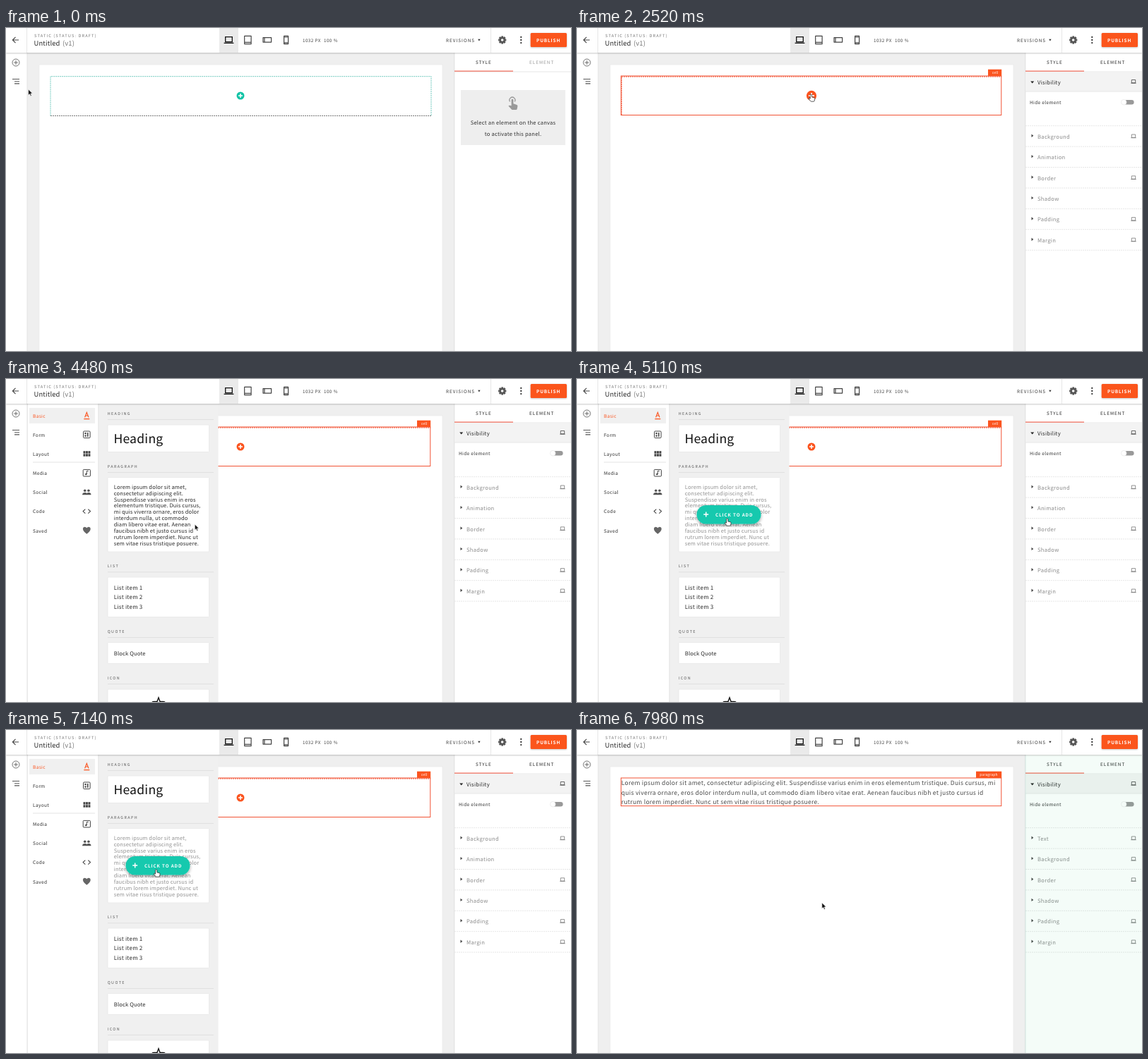
An HTML page that plays this animation: 800 by 458 pixels, repeating every 8000 ms.

```html
<!DOCTYPE html>
<html lang="en">
<head>
<meta charset="utf-8">
<title>Page editor</title>
<style>
  html, body { margin: 0; width: 100%; height: 100%; overflow: hidden; background: #fff; }
  svg { display: block; width: 100vw; height: 100vh; }
  text {
    font-family: "Noto Sans CJK SC", "Noto Sans CJK JP", "Noto Sans CJK TC", "Noto Sans CJK KR", "Noto Sans CJK", "Open Sans", sans-serif;
    text-rendering: geometricPrecision;
    white-space: pre;
  }
</style>
</head>
<body>
<svg id="stage" viewBox="0 0 800 458"></svg>
<script>
const LOOP = 8000;
const TEAL = '#12c3a6', RED = '#f0401f', ORANGE = '#fb541f', INK = '#2b2b2b', GREY = '#8b8b8b';

// The CJK face draws its Latin letters about 1.117 times larger per em.
const text = (x, y, str, size, gap = 0, fill = INK, extra = '') =>
  `<text x="${x}" y="${y}" font-size="${(size / 1.117).toFixed(2)}" letter-spacing="${gap}" fill="${fill}" ${extra}>${str}</text>`;
const rect = (x, y, w, h, fill, extra = '') =>
  `<rect x="${x}" y="${y}" width="${w}" height="${h}" fill="${fill}" ${extra}/>`;
const line = (d, stroke, width = 1, extra = '') =>
  `<path d="${d}" fill="none" stroke="${stroke}" stroke-width="${width}" ${extra}/>`;
const shape = (d, fill, extra = '') => `<path d="${d}" fill="${fill}" ${extra}/>`;
const dot = (x, y, r, fill, extra = '') => `<circle cx="${x}" cy="${y}" r="${r}" fill="${fill}" ${extra}/>`;
const group = (id, body, extra = '') => `<g id="${id}" ${extra}>${body}</g>`;
const laptop = (x, y, stroke = '#777') =>
  line(`M${x - 2.7} ${y + 1.8}v-4.3h5.4v4.3zM${x - 3.7} ${y + 2.2}h7.4`, stroke, .8);

function header() {
  const gearTeeth = Array.from({ length: 8 }, (_, i) =>
    rect(701.3, 11.4, 2.8, 3, '#555', `transform="rotate(${i * 45} 702.7 17)"`)).join('');
  return rect(0, 0, 800, 35, '#fff', 'filter="url(#drop)"') +
    line('M18 17H9.5M13.5 12.8L9.3 17l4.2 4.2', '#444', 1.1) +
    line('M29.5 0V35M686.5 0V35', '#e6e6e6') +
    text(40, 13.3, 'STATIC (STATUS: DRAFT)', 6.4, 1.1, '#777') +
    text(39.5, 25, 'Untitled', 10.5, .15) + text(80, 25, '(v1)', 10.5, .15, '#777') +
    rect(302, 0, 27, 35, '#eaeaea') +
    line('M310.7 19.6v-7h9.6v7zM308.6 21.3h13.8', '#111', 1.3) +
    line('M337.7 11.3h9.4v11.4h-9.4zM337.7 20.4h9.4', '#444', 1.2, 'stroke-linejoin="round"') +
    line('M364 13.7h11.6v6.4h-11.6zM366 13.7v6.4', '#444', 1.2, 'stroke-linejoin="round"') +
    line('M393.6 11.4h6v11.2h-6zM393.6 13h6M393.6 20.8h6', '#444', 1.2, 'stroke-linejoin="round"') +
    text(420, 19.5, '1032 PX', 7, .45, '#444') + text(450, 19.5, '100 %', 7, .45, '#444') +
    text(623, 19.5, 'REVISIONS', 7, 1.05, '#333') + shape('M668.2 15.8h3.4l-1.7 2.6z', '#333') +
    gearTeeth + dot(702.7, 17, 3, 'none', 'stroke="#555" stroke-width="2.4"') +
    [12.9, 17, 21.1].map(y => dot(729.3, y, 1.15, '#333')).join('') +
    rect(742.7, 7, 51.3, 20, ORANGE, 'rx="1.5" filter="url(#drop)"') +
    text(751, 19.6, 'PUBLISH', 7.2, .85, '#fff', 'font-weight="700"');
}

function rail() {
  return rect(0, 35, 30, 423, '#fff') + line('M30 35V458', '#e3e3e3') +
    dot(14, 49, 5, 'none', 'stroke="#666" stroke-width=".9"') + line('M11.2 49h5.6M14 46.2v5.6', '#666') +
    line('M9 72.5h10M12 75.7h7M12 78.9h7', '#555', 1.1);
}

function drawer() {
  const names = ['Basic', 'Form', 'Layout', 'Media', 'Social', 'Code', 'Saved'];
  const cats = names.map((name, i) =>
    text(38, 54.6 + i * 27.15, name, 7.3, .36, i ? INK : ORANGE, 'font-weight="500"')).join('');
  const icons =
    line('M111.6 54.5l2.7-7.2 2.7 7.2M112.5 52h3.6M110.3 56.6h8', ORANGE, 1.1) +
    rect(109.5, 74, 9.6, 9.6, 'none', 'rx="1.2" stroke="#444"') +
    rect(111.4, 76, 2.2, 2.2, '#444') + rect(111.4, 79.5, 2.2, 2.2, '#444') + line('M115.7 76v5.8', '#444', 1.6) +
    [102.2, 106.3].map(y => [109.5, 113, 116.5].map(x => rect(x, y, 2.9, 3.4, '#444')).join('')).join('') +
    rect(109.2, 128.4, 10.2, 9.6, 'none', 'rx="1" stroke="#444"') +
    line('M114.3 135v-4.6h2.4', '#444', 1) + dot(113.3, 135, 1.2, '#444') +
    dot(111.7, 158.3, 1.8, '#555') + dot(116.9, 158.3, 1.8, '#555') +
    shape('M108 164.3q.3-3.2 3.8-3.2 2.2 0 2.6 1.2.6-1.2 2.6-1.2 3.4 0 3.5 3.2z', '#555') +
    line('M112.3 184.6l-3.2 3 3.2 3M116.3 184.6l3.2 3-3.2 3', '#444', 1.1) +
    shape('M114.3 219.8q-5.4-4.2-5.4-7 0-3 2.8-3 1.7 0 2.6 1.5.9-1.5 2.6-1.5 2.8 0 2.8 3 0 2.8-5.4 7z', '#666');

  const section = (y, name) => text(143.7, y, name, 6, 1.43, '#555') + line(`M144 ${y + 6.5}H294`, '#e0e0e0');
  const card = (y, h) => rect(144, y, 143.5, h, '#fff', 'stroke="#e6e6e6" stroke-width=".7" rx="1"');
  const lorem = ['Lorem ipsum dolor sit amet,', 'consectetur adipiscing elit.', 'Suspendisse varius enim in eros',
    'elementum tristique. Duis cursus,', 'mi quis viverra ornare, eros dolor', 'interdum nulla, ut commodo',
    'diam libero vitae erat. Aenean', 'faucibus nibh et justo cursus id', 'rutrum lorem imperdiet. Nunc ut',
    'sem vitae risus tristique posuere.'];
  const star = Array.from({ length: 10 }, (_, i) => {
    const a = i * Math.PI / 5, r = i % 2 ? 3.4 : 8.2;
    return `${(216 + r * Math.sin(a)).toFixed(1)},${(460 - r * Math.cos(a)).toFixed(1)}`;
  }).join(' ');

  return rect(31, 35, 100, 423, '#fff') + rect(33, 41, 93, 22, '#f0f0f0') + cats + icons +
    line('M38 118H126', '#e4e4e4') +
    rect(130.5, 35, 170, 423, '#f0f0f0') + line('M131 35V458', '#e3e3e3') +
    section(51, 'HEADING') + card(65, 38.5) + text(152.4, 91.2, 'Heading', 19.6, .25, '#111') +
    section(126, 'PARAGRAPH') + card(139.5, 105.5) +
    group('lorem', lorem.map((s, i) => text(152.8, 155.8 + i * 8.87, s, 8.5, .11)).join('')) +
    section(267.3, 'LIST') + card(281, 56.5) +
    [1, 2, 3].map(n => text(152.8, 285.8 + n * 13.3, 'List item ' + n, 9, .22)).join('') +
    section(360, 'QUOTE') + card(373.5, 30) + text(152.8, 391.7, 'Block Quote', 8.5, .15) +
    section(426, 'ICON') + card(440, 40) +
    `<polygon points="${star}" fill="none" stroke="#111" stroke-width="1.4"/>` +
    group('add', rect(169.5, 179, 91, 26.5, '#19c9ae', 'rx="13.2" filter="url(#lift)"') +
      line('M179.2 192h7M182.7 188.5v7', '#fff', 1.5) +
      text(196, 194.7, 'CLICK TO ADD', 7, .9, '#fff', 'font-weight="700"'));
}

function rows(id, names, plain) {
  return group(id, names.map((name, i) => {
    const y = 153.5 + i * 29.4;
    return shape(`M643.5 ${y - 3}v4.4l2.8-2.2z`, '#444') + text(652, y + 3.2, name, 8.5, .3, GREY) +
      (plain.includes(name) ? '' : laptop(788, y)) +
      line(`M635 ${y + 14.6}H800`, '#e0e0e0', .8, 'stroke-dasharray="2 1"');
  }).join(''));
}

function panel() {
  return rect(635, 35, 165, 423, '#fff') + line('M634.8 35V458', '#e0e0e0') +
    line('M635 62H800', '#e6e6e6') + text(665, 51.3, 'STYLE', 7, 1, '#222') +
    text(741, 51.3, 'ELEMENT', 7, 1.05, '#222', 'id="elementTab"') +
    group('hint', rect(644, 88, 148, 78, '#eee') +
      line('M713.6 104.4a4 4 0 1 1 6.6 0', '#999', 1.3) +
      shape('M715.6 102.2a1.4 1.4 0 0 1 2.8 0v5l5 1.8q1.2.5 1 2l-.8 4q-.2 1-1.3 1h-5q-.8 0-1.4-.6l-4.5-4.9q1-1.6 4.2-.2z', '#999') +
      text(718, 137.2, 'Select an element on the canvas', 8.5, .22, '#333', 'text-anchor="middle"') +
      text(718, 152.7, 'to activate this panel.', 8.5, .22, '#333', 'text-anchor="middle"')) +
    group('props', rect(635, 62.5, 165, 27.5, '#f3f3f3') + line('M635 90H800', '#e6e6e6') +
      shape('M642.2 75.6h5l-2.5 3z', '#222') + text(652, 79.9, 'Visibility', 8.5, .3) + laptop(788, 76, '#444') +
      text(641, 108, 'Hide element', 7.3, .33, '#333') +
      rect(774, 102, 14.6, 6.4, '#999', 'rx="3.2"') + dot(774.3, 105.2, 3.8, '#fff', 'stroke="#ddd" stroke-width=".5"') +
      line('M635 138.7H800', '#e0e0e0', .8, 'stroke-dasharray="2 1"') +
      rows('cellRows', ['Background', 'Animation', 'Border', 'Shadow', 'Padding', 'Margin'], ['Animation', 'Shadow']) +
      rows('textRows', ['Text', 'Background', 'Border', 'Shadow', 'Padding', 'Margin'], ['Shadow'])) +
    rect(635, 60.6, 83, 1, '#ee4b36');
}

function canvas() {
  const copy = ['Lorem ipsum dolor sit amet, consectetur adipiscing elit. Suspendisse varius enim in eros elementum tristique. Duis cursus, mi',
    'quis viverra ornare, eros dolor interdum nulla, ut commodo diam libero vitae erat. Aenean faucibus nibh et justo cursus id',
    'rutrum lorem imperdiet. Nunc ut sem vitae risus tristique posuere.'];
  return rect(0, 0, 800, 458, '#efefef') + rect(47, 52, 571, 420, '#fff', 'stroke="#e8e8e8" stroke-width=".6"') +
    group('idle', line('M63 124.5V68.7H602V124.5', '#6fc9bd', 1, 'stroke-dasharray="2 1"') +
      line('M63 124.5H602', '#777', 1, 'stroke-dasharray="2 1"')) +
    group('box', rect(62.3, 68, 538.5, 55.5, 'none', 'id="frame" stroke="currentColor" stroke-width=".9"') +
      line('M63 123V69H601', 'currentColor', 1, 'id="dashes" stroke-dasharray="2 1"') +
      rect(582, 58.7, 19.2, 9.3, TEAL, 'id="tag"') +
      text(592, 65.1, 'cell', 5.6, .15, '#fff', 'id="tagText" text-anchor="middle"')) +
    group('copy', copy.map((s, i) => text(62.8, 78.4 + i * 13.35, s, 9.5, .287, '#4a4a4a')).join('')) +
    group('plus', dot(0, 0, 5.5, 'currentColor') + line('M-3 0h6M0-3v6', '#fff', 1.5));
}

const stage = document.getElementById('stage');
stage.innerHTML = `<defs>
  <filter id="drop" x="-20%" y="-50%" width="140%" height="220%"><feDropShadow dx="0" dy=".8" stdDeviation="1" flood-opacity=".25"/></filter>
  <filter id="lift" x="-20%" y="-50%" width="140%" height="220%"><feDropShadow dx="0" dy="2" stdDeviation="2" flood-opacity=".35"/></filter>
  <linearGradient id="edge"><stop offset="0" stop-color="${TEAL}" stop-opacity="0"/><stop offset=".5" stop-color="${TEAL}" stop-opacity=".3"/><stop offset="1" stop-color="${TEAL}" stop-opacity="0"/></linearGradient>
  <clipPath id="right"><rect x="30" y="35" width="605" height="423"/></clipPath></defs>` +
  canvas() + group('drawerClip', group('drawer', drawer()), 'clip-path="url(#right)"') + rail() + panel() +
  group('tint', rect(635, 35.5, 165, 423, '#37cf87', 'opacity=".25"')) +
  group('rim', rect(631, 35.5, 8, 423, 'url(#edge)') + line('M635 36V458', TEAL, 1.2)) +
  header() +
  group('arrow', shape('M0 0V8.2L1.9 6.5 3.2 9.4 4.6 8.8 3.3 6 5.8 5.8z', '#111', 'stroke="#fff" stroke-width=".6" transform="translate(-.7 0)"')) +
  group('hand', shape('M-1 1a1.15 1.15 0 0 1 2.3 0v2.9l3.2.8q1.3.4 1.1 1.7l-.6 2.7q-.2 1.1-1.2 1.1h-3.2q-.8 0-1.3-.7L-3.4 6q.8-1.1 2.4.2z', '#fff', 'stroke="#333" stroke-width=".8"'));

const el = {};
stage.querySelectorAll('[id]').forEach(e => el[e.id] = e);
const show = (id, on) => { el[id].style.display = on ? '' : 'none'; };
const set = (id, name, value) => el[id].setAttribute(name, value);

const ramp = (t, a, b) => Math.min(1, Math.max(0, (t - a) / (b - a)));
const ease = k => k * k * (3 - 2 * k);

// Pointer tip: time, x, y
const path = [[0, 32.3, 87], [140, 32.3, 87], [950, 360.5, 100], [1820, 360.5, 100], [2350, 331.2, 94],
  [3650, 331.2, 94], [4480, 268, 206], [5050, 212.5, 198], [7290, 212.5, 198], [7430, 207, 196.5],
  [7520, 207, 196.5], [7930, 347.5, 245], [8000, 347.5, 245]];

function pointer(t) {
  let i = 1;
  while (i < path.length - 1 && t >= path[i][0]) i++;
  const [t0, x0, y0] = path[i - 1], [t1, x1, y1] = path[i];
  const k = ease(ramp(t, t0, t1));
  return [x0 + (x1 - x0) * k, y0 + (y1 - y0) * k];
}

const SELECT = 1680, OPEN = 3080, HOVER = 4560, ADD = 7280, READY = 7630;

function draw(t) {
  const [x, y] = pointer(t);
  const hovered = x > 62 || t > 1000;
  const selected = t >= SELECT, added = t >= ADD, ready = t >= READY;
  const active = selected && !added || ready;

  show('idle', !hovered);
  show('box', hovered);
  el.box.style.color = active ? RED : TEAL;
  set('frame', 'height', added ? 39.7 : 55.5);
  show('dashes', !added);
  set('tag', 'fill', active ? ORANGE : TEAL);
  set('tag', 'x', ready ? 565 : 582);
  set('tag', 'width', ready ? 36.2 : 19.2);
  set('tagText', 'x', ready ? 583 : 592);
  el.tagText.textContent = ready ? 'paragraph' : 'cell';
  show('copy', ready);

  const big = ease(ramp(t, 2200, 2320)) * (1 - ease(ramp(t, 3780, 3880)));
  show('plus', !added);
  el.plus.style.color = selected ? ORANGE : TEAL;
  set('plus', 'transform', `translate(332 96) scale(${1 + .3 * big})`);

  const out = ease(ramp(t, OPEN, OPEN + 200)) * (1 - ease(ramp(t, ADD, ADD + 130)));
  show('drawerClip', out > 0);
  set('drawer', 'transform', `translate(${-271 * (1 - out)} 0)`);
  const over = ease(ramp(t, HOVER, HOVER + 200));
  set('lorem', 'opacity', 1 - .5 * over);
  set('add', 'opacity', over);

  show('hint', !selected);
  show('props', selected);
  show('cellRows', !added);
  show('textRows', added);
  set('elementTab', 'fill', selected ? '#222' : '#999');

  const flash = ramp(t, ADD, ADD + 140), fade = ramp(t, 7530, 7980);
  set('tint', 'opacity', flash * (1 - .8 * fade));
  set('rim', 'opacity', flash * (1 - .95 * fade));

  const hand = hovered && t < 3780 || t >= HOVER && t < ADD + 70;
  show('hand', hand);
  show('arrow', !hand);
  set(hand ? 'hand' : 'arrow', 'transform', `translate(${x} ${y})`);
}

const start = performance.now();
function tick() {
  draw((performance.now() - start) % LOOP);
  requestAnimationFrame(tick);
}
tick();
</script>
</body>
</html>
```
